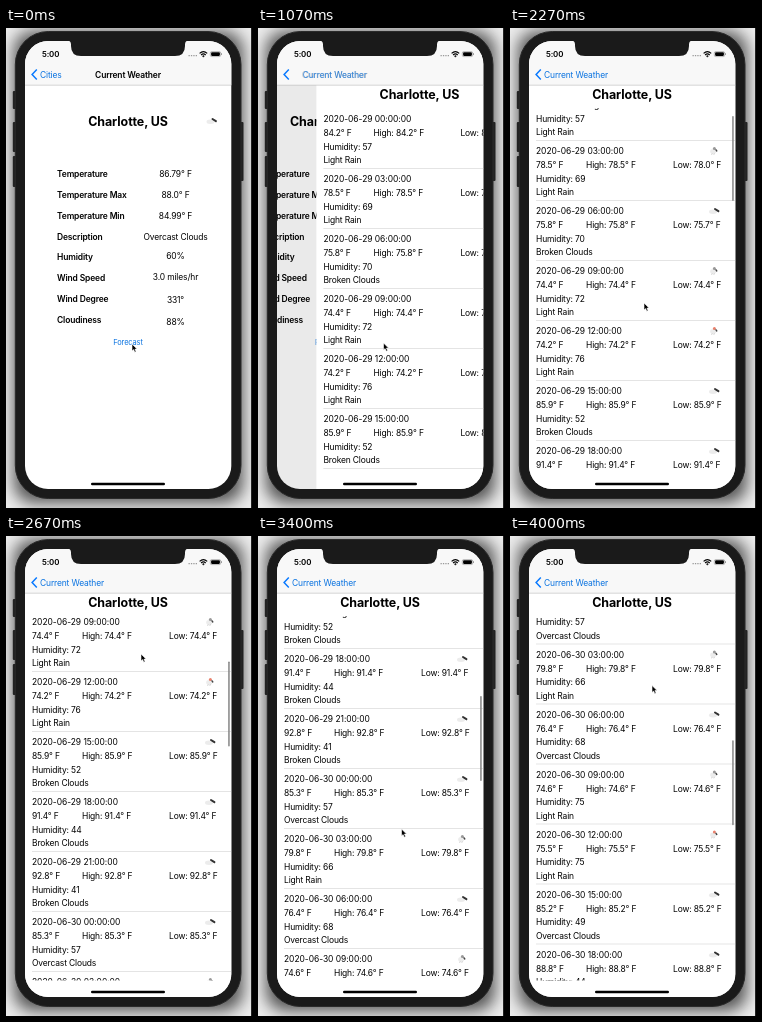
An HTML page that plays this animation: 246 px wide and 480 px high, repeating every 4.07 s.

```html
<!DOCTYPE html>
<html lang="en">
<head>
<meta charset="utf-8">
<title>Weather app</title>
<style>
  html, body { margin: 0; width: 100%; height: 100%; overflow: hidden; background: #ececec; }
  svg { display: block; width: 246px; height: 480px; }
  text { font: 400 8.46px Inter, "Liberation Sans", sans-serif; letter-spacing: -.14px; fill: #000; }
  .bold { font-weight: 600; }
  .city { font-size: 12.44px; font-weight: 700; letter-spacing: -.07px; }
  .date { letter-spacing: -.04px; }
  .small { font-size: 7.46px; }
  .clock { font-size: 7.9px; font-weight: 600; }
  .blue { fill: #0a73e0; }
  .mid { text-anchor: middle; }
</style>
</head>
<body>
<svg viewBox="0 0 246 480">
  <defs>
    <filter id="blur" x="-20%" y="-20%" width="140%" height="140%"><feGaussianBlur stdDeviation="8"/></filter>
    <clipPath id="screen"><rect x="19" y="13" width="206.3" height="448" rx="23"/></clipPath>
    <clipPath id="listArea"><rect x="19" y="80" width="206.3" height="364.5"/></clipPath>
  </defs>

  <rect width="246" height="480" fill="#ececec"/>
  <rect x="8" y="3" width="229" height="472" rx="20" opacity=".65" filter="url(#blur)"/>
  <path d="M245.5 0V480" stroke="#222"/>
  <g fill="#222">
    <rect x="6.8" y="63" width="4" height="18" rx="1"/>
    <rect x="6.8" y="94" width="4" height="30" rx="1"/>
    <rect x="6.8" y="128" width="4" height="31" rx="1"/>
    <rect x="233.5" y="94" width="4" height="59" rx="1"/>
  </g>
  <rect x="9.3" y="3.5" width="225.7" height="467" rx="33" fill="#1a1a1a" stroke="#2a2a2a"/>

  <g clip-path="url(#screen)">
    <rect x="19" y="13" width="207" height="448" fill="#fff"/>
    <g id="detail"></g>
    <rect id="dim" x="19" y="57" width="207" height="404" opacity="0"/>
    <g id="forecast">
      <rect x="19" y="57" width="207" height="404" fill="#fff"/>
      <g clip-path="url(#listArea)"><g id="rows"></g></g>
      <rect id="bar" x="222.2" width="1.5" height="85" rx=".75" fill="#858585"/>
    </g>
    <rect x="19" y="13" width="207" height="44" fill="#f8f8f8"/>
    <path d="M19 57.2H226" stroke="#b9b9b9" stroke-width=".6"/>
    <g id="nav"></g>
    <path d="M30.8 41.6l-4.7 4.9 4.7 4.9" fill="none" stroke="#0a7aff" stroke-width="1.5"/>
    <rect x="85" y="454.8" width="74" height="2.5" rx="1.25"/>
  </g>

  <path d="M61 12.5q4 0 4 4v1.5q0 10 10 10h94q10 0 10-10v-1.5q0-4 4-4z" fill="#1a1a1a"/>
  <text class="clock" x="36" y="28.8">5:00</text>
  <path d="M182.5 27.7h8.5" stroke="#999" stroke-width="1.3" stroke-dasharray="1.3 1.1"/>
  <g fill="none" stroke="#000" stroke-width="1.2">
    <path d="M193.6 25.4q3.8-3.4 7.6 0M195.1 27q2.3-2.1 4.6 0"/>
    <circle cx="197.4" cy="28.3" r=".4"/>
  </g>
  <rect x="204.3" y="23.6" width="10.4" height="5" rx="1.4" fill="#fff" stroke="#777" stroke-width=".5"/>
  <rect x="205.1" y="24.3" width="8.8" height="3.6" rx=".8"/>
  <path d="M215.5 25.2v1.8" stroke="#777" stroke-width=".7"/>

  <path id="cursor" d="M0 0v7l1.6-1.4 1.2 2.6 1.3-.6-1.2-2.5h2.2z" stroke="#fff" stroke-width=".6"/>
</svg>
<script>
const LOOP = 4070, FPS = 15, PITCH = 60;
const $ = id => document.getElementById(id);

function add(parent, tag, attrs, text = "") {
  const el = document.createElementNS("http://www.w3.org/2000/svg", tag);
  for (const name in attrs) el.setAttribute(name, attrs[name]);
  el.textContent = text;
  return parent.appendChild(el);
}
const label = (parent, x, y, text, cls = "") => add(parent, "text", { x, y, class: cls }, text);
const move = (el, x, y = 0) => el.setAttribute("transform", `translate(${x} ${y})`);

function icon(parent, x, y, kind) {
  const g = add(parent, "g", {});
  move(g, x, y);
  if (kind === "cloud") {
    add(g, "ellipse", { cx: -1, cy: .8, rx: 4, ry: 2.2, fill: "#ececec" });
    add(g, "path", { d: "M1-2l3.4 2.2", stroke: "#333", "stroke-width": 2, "stroke-linecap": "round" });
  } else {
    add(g, "ellipse", { cx: -.8, cy: .5, rx: 3, ry: 2.4, fill: "#ececec" });
    add(g, "circle", { cx: .4, cy: -2.6, r: 1.5, fill: kind === "sun" ? "#e8806c" : "#999" });
    add(g, "path", { d: "M2-1.2l.8 1.2", stroke: "#444", "stroke-width": 1.4, "stroke-linecap": "round" });
    add(g, "path", { d: "M-1.8 2.4l-.6 1.4M.4 2.4l-.6 1.4", stroke: "#bbb", "stroke-width": .7 });
  }
}

// Current weather page: name, value, and the two baselines
const detail = $("detail");
label(detail, 122, 97.8, "Charlotte, US", "city mid");
icon(detail, 205.5, 93, "cloud");
[
  ["Temperature", "86.79° F", 149.2, 149.2],
  ["Temperature Max", "88.0° F", 170, 170],
  ["Temperature Min", "84.99° F", 190.7, 190.7],
  ["Description", "Overcast Clouds", 211.6, 211.6],
  ["Humidity", "60%", 232.4, 231],
  ["Wind Speed", "3.0 miles/hr", 253.2, 251.6],
  ["Wind Degree", "331°", 274, 274.6],
  ["Cloudiness", "88%", 294.8, 296.6],
].forEach(([name, value, y1, y2]) => {
  label(detail, 51, y1, name, "bold");
  label(detail, 169.5, y2, value, "mid");
});
const link = label(detail, 122, 317.3, "Forecast", "small blue mid");

// Forecast page: one entry every three hours
const LOWS = { 0: "83.4", 1: "78.0", 2: "75.7" };
const SKY = { r: ["Light Rain", "rain"], s: ["Light Rain", "sun"], b: ["Broken Clouds", "cloud"], o: ["Overcast Clouds", "cloud"] };
const rows = $("rows");
label($("forecast"), 122, 70.8, "Charlotte, US", "city mid");
[
  [84.2, 57, "s"], [78.5, 69, "r"], [75.8, 70, "b"], [74.4, 72, "r"], [74.2, 76, "s"],
  [85.9, 52, "b"], [91.4, 44, "b"], [92.8, 41, "b"], [85.3, 57, "o"], [79.8, 66, "r"],
  [76.4, 68, "o"], [74.6, 75, "r"], [75.5, 75, "s"], [85.2, 49, "o"], [88.8, 44, "o"],
].forEach(([temp, humidity, sky], i) => {
  const y = 94 + i * PITCH;
  const hour = String(i % 8 * 3).padStart(2, "0");
  const [text, kind] = SKY[sky];
  label(rows, 26, y, `2020-06-${i < 8 ? 29 : 30} ${hour}:00:00`, "date");
  label(rows, 26, y + 14.1, `${temp}° F`);
  label(rows, 76, y + 14.1, `High: ${temp}° F`);
  label(rows, 163, y + 14.1, `Low: ${LOWS[i] || temp}° F`);
  label(rows, 26, y + 27.6, `Humidity: ${humidity}`);
  label(rows, 26, y + 41.3, text);
  icon(rows, 204, y - 3, kind);
  add(rows, "path", { d: `M26 ${y + 46.5}H226`, stroke: "#c8c8c8", "stroke-width": .5 });
});

const nav = $("nav");
const cities = label(nav, 34, 49.5, "Cities", "blue");
const title = label(nav, 122, 49.5, "Current Weather", "bold mid");
const back = label(nav, 34, 49.5, "Current Weather", "blue");

// Tables of [step, value...]
const SCROLL = [
  [31, 0], [32, 4], [34, 28], [36, 72], [38, 128], [40, 185], [41, 209.5], [42, 231], [43, 250],
  [44, 266], [45, 280.5], [46, 293], [48, 313], [50, 326], [51, 328], [53, 356], [55, 393],
  [57, 450], [58, 477], [59, 496], [60, 512.5],
];
const POINTER = [
  [0, 126, 316], [2, 125.5, 315], [23, 125.5, 315], [31, 133.5, 304], [32, 133.7, 299], [34, 134, 275],
  [36, 134.5, 231], [38, 135, 175], [40, 135, 118], [41, 135.5, 120], [43, 138, 165], [46, 141, 246.5],
  [48, 142.5, 284], [50, 143.5, 296], [51, 143.5, 293], [53, 143.5, 265], [55, 143.5, 227.5],
  [57, 143, 171], [58, 142.5, 144], [59, 142, 141], [60, 142, 149.5],
];

function sample(table, k) {
  const i = table.findIndex(row => row[0] >= k);
  if (i < 0) return table[table.length - 1].slice(1);
  if (i === 0) return table[0].slice(1);
  const a = table[i - 1], b = table[i], u = (k - a[0]) / (b[0] - a[0]);
  return a.slice(1).map((v, j) => v + (b[j + 1] - v) * u);
}

// Damped spring for the page push
function push(k) {
  if (k < 13) return 0;
  if (k >= 20) return 1;
  const a = (k - 12.6) * .9;
  return 1 - (1 + a) * Math.exp(-a);
}

function draw(ms) {
  const k = Math.floor((ms % LOOP + 4) * FPS / 1000);
  const p = push(k);
  const [offset] = sample(SCROLL, k);

  link.style.fill = k >= 11 && k <= 13 ? "#dcdcdc" : "";

  move(detail, -62 * p);
  $("dim").setAttribute("opacity", .1 * p);
  move($("forecast"), 207 * (1 - p));
  move(rows, 0, -offset);
  $("bar").setAttribute("y", 81.2 + .24 * offset);
  $("bar").setAttribute("opacity", k >= 32 ? 1 : 0);

  move(cities, -60 * p);
  cities.setAttribute("opacity", Math.max(0, 1 - 1.5 * p));
  move(title, -56 * p);
  title.setAttribute("opacity", 1 - p);
  move(back, 56 * (1 - p));
  back.setAttribute("opacity", p);

  move($("cursor"), ...sample(POINTER, k));
}

const start = performance.now();
function tick(now) {
  draw(Math.max(0, now - start));
  requestAnimationFrame(tick);
}
draw(0);
requestAnimationFrame(tick);
</script>
</body>
</html>
```
